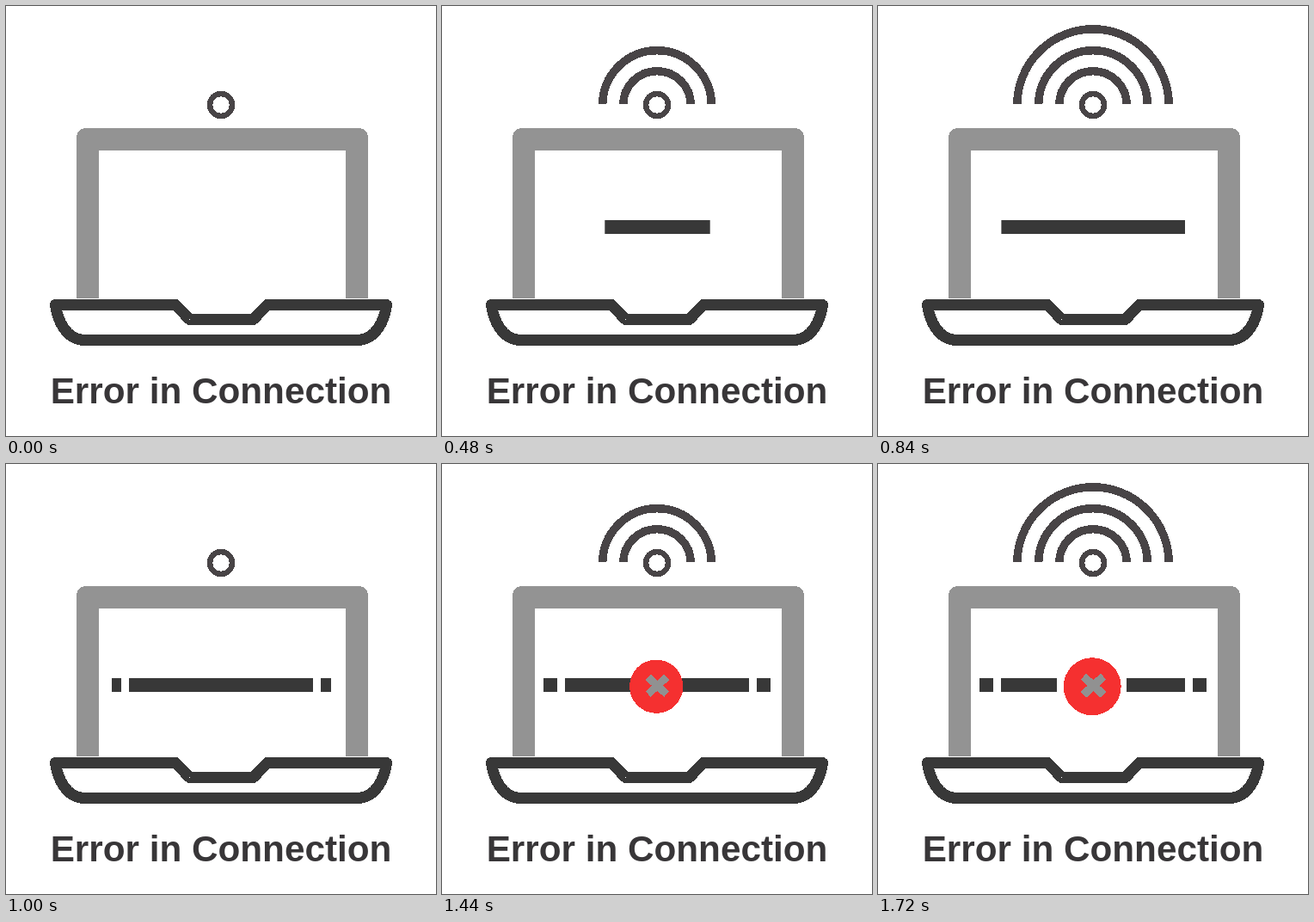
Write an HTML page that moves like this. It is 500 by 500 pixels and loops after 1.76 s.

```html
<!DOCTYPE html>
<html lang="en">
<head>
<meta charset="utf-8">
<title>Error in Connection</title>
<style>
  html, body { margin: 0; width: 100%; height: 100%; overflow: hidden; background: #fff; }
  svg { display: block; width: 100%; height: 100%; shape-rendering: crispEdges; }
  text { font: bold 42.25px "Liberation Sans", Arial, sans-serif; }
</style>
</head>
<body>
<svg viewBox="0 0 500 500">
  <clipPath id="sky"><rect width="500" height="114"/></clipPath>
  <g fill="none" stroke="#484446">
    <circle cx="250" cy="115" r="13" stroke-width="6.5"/>
    <g id="arcs" stroke-width="9.5" clip-path="url(#sky)">
      <circle cx="250" cy="115" r="39.3"/>
      <circle cx="250" cy="115" r="63.3"/>
      <circle cx="250" cy="115" r="88.2"/>
    </g>
  </g>

  <path fill="#939393" d="M82 340V154Q82 142 94 142H409Q421 142 421 154V340H395V168H108V340Z"/>
  <path fill="#fff" stroke="#383838" stroke-width="13" stroke-linejoin="round"
    d="M57.5 347.5H197L213.5 364.5H287.5L304 347.5H442.5C440 366 430 388.5 408 388.5H92C70 388.5 60 366 57.5 347.5Z"/>

  <clipPath id="reveal"><rect id="window" y="249" height="16"/></clipPath>
  <g clip-path="url(#reveal)">
    <path fill="#383838" d="M118 249h16v16h-16zM143 249h214v16h-214zM366 249h16v16h-16z"/>
    <rect id="gap" y="248" height="18" fill="#fff"/>
  </g>

  <g id="badge">
    <circle r="33.5" fill="#f53030"/>
    <path d="M-10.3 -11.6L12.9 9.6M12.9 -11.6L-10.3 9.6" stroke="#919191" stroke-width="9.5"/>
  </g>

  <text x="250" y="462" text-anchor="middle" fill="#383638">Error in Connection</text>
</svg>
<script>
  const STEP = 40, LOOP = 1760;
  const SIGNAL_PERIOD = 25, SIGNAL_OFF = 24, ARC_STARTS = [4, 9, 14];

  // Tables of [step, value], joined by straight lines.
  const GAP_LEFT = [[26, 252], [31, 237], [42, 208]];
  const GAP_RIGHT = [[26, 252], [31, 265], [42, 289]];
  const BADGE_SCALE = [[30, 0], [31, 0.02], [36, 0.93], [43, 1]];

  const byId = id => document.getElementById(id);
  const arcs = [...byId("arcs").children];
  const reveal = byId("window"), gap = byId("gap"), badge = byId("badge");

  function valueAt(table, step) {
    if (step <= table[0][0]) return table[0][1];
    for (let i = 1; i < table.length; i++) {
      const [a, from] = table[i - 1], [b, to] = table[i];
      if (step <= b) return from + (to - from) * (step - a) / (b - a);
    }
    return table[table.length - 1][1];
  }

  function setSpan(rect, left, right) {
    rect.setAttribute("x", left);
    rect.setAttribute("width", right - left);
  }

  function draw() {
    const step = Math.floor(performance.now() % LOOP / STEP);
    const phase = step % SIGNAL_PERIOD;
    arcs.forEach((arc, i) => {
      const on = phase >= ARC_STARTS[i] && phase < SIGNAL_OFF;
      arc.setAttribute("visibility", on ? "visible" : "hidden");
    });

    const half = Math.min(134, 5.1 * step);
    setSpan(reveal, 250.5 - half, 250.5 + half);
    setSpan(gap, valueAt(GAP_LEFT, step), valueAt(GAP_RIGHT, step));

    const scale = valueAt(BADGE_SCALE, step);
    badge.setAttribute("visibility", scale > 0 ? "visible" : "hidden");
    badge.setAttribute("transform", `translate(249.2 258.7) scale(${scale})`);
    requestAnimationFrame(draw);
  }
  draw();
</script>
</body>
</html>
```
